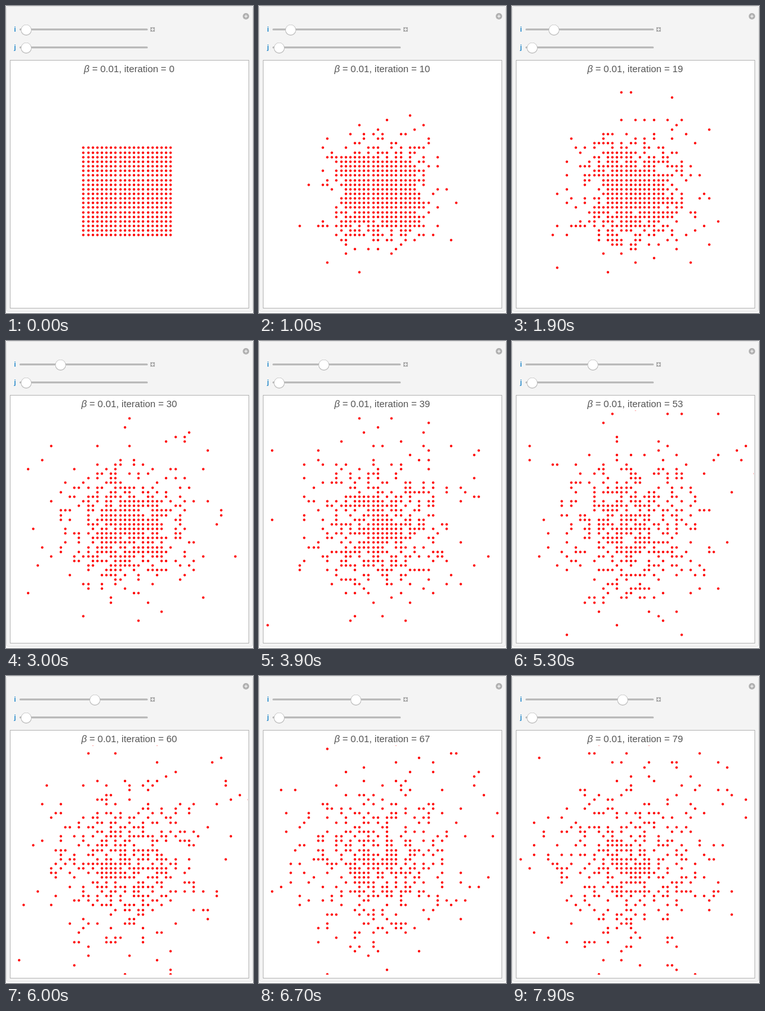
Animation, 385 px wide and 478 px high, one loop 8 s. Source, as an HTML page with a canvas:

```html
<!DOCTYPE html>
<html lang="en">
<head>
<meta charset="utf-8">
<title>Lattice diffusion</title>
<style>
html, body { margin: 0; width: 100%; height: 100%; overflow: hidden; background: #fff; }
canvas { display: block; }
</style>
</head>
<body>
<canvas id="stage" width="385" height="478"></canvas>
<script>
const ctx = document.getElementById('stage').getContext('2d');
const STEP_MS = 100, STEPS = 80, SIDE = 20;
const PITCH = 7.165, LEFT = 120.84, TOP = 220.85;
const HOPS_PER_STEP = 420;
const SANS = '"Liberation Sans", Arial, sans-serif';

// Seeded generator, so every loop shows the same walk.
let seed = 20417;
function random() {
  seed = (seed + 0x6D2B79F5) | 0;
  let r = Math.imul(seed ^ (seed >>> 15), 1 | seed);
  r = (r + Math.imul(r ^ (r >>> 7), 61 | r)) ^ r;
  return ((r ^ (r >>> 14)) >>> 0) / 4294967296;
}

// Random hops of one or two sites; an occupied site on the way blocks the hop,
// so the crowded core loosens slowly while free dots roam.
function simulate() {
  const key = (x, y) => x * 1000 + y;
  const dots = Array.from({ length: SIDE * SIDE }, (_, n) => [n % SIDE, Math.floor(n / SIDE)]);
  const taken = new Set(dots.map(([x, y]) => key(x, y)));
  const states = [];
  for (let step = 0; step < STEPS; step++) {
    states.push(dots.map(dot => [...dot]));
    for (let hop = 0; hop < HOPS_PER_STEP; hop++) {
      const dot = dots[Math.floor(random() * dots.length)];
      const sign = random() < 0.5 ? 1 : -1;
      const [dx, dy] = random() < 0.5 ? [sign, 0] : [0, sign];
      const reach = random() < 0.5 ? 1 : 2;
      const [x, y] = dot;
      if (taken.has(key(x + dx, y + dy))) continue;
      if (taken.has(key(x + dx * reach, y + dy * reach))) continue;
      taken.delete(key(x, y));
      dot[0] += dx * reach;
      dot[1] += dy * reach;
      taken.add(key(...dot));
    }
  }
  return states;
}

function rect(x, y, w, h, color) {
  ctx.fillStyle = color;
  ctx.fillRect(x, y, w, h);
}

function disc(x, y, r, color) {
  ctx.fillStyle = color;
  ctx.beginPath();
  ctx.arc(x, y, r, 0, 2 * Math.PI);
  ctx.fill();
}

function plus(x, y) {
  rect(x - 2.5, y - 0.5, 5, 1, '#fff');
  rect(x - 0.5, y - 2.5, 1, 5, '#fff');
}

function slider(label, y, thumbX) {
  ctx.font = 'bold 11px ' + SANS;
  ctx.fillStyle = '#2a8ccc';
  ctx.fillText(label, 12.5, y + 3);
  ctx.fillStyle = '#bbb';
  ctx.beginPath();
  ctx.roundRect(21, y - 2, 200, 3, 1.5);
  ctx.fill();
  disc(thumbX, y + 0.5, 8.4, '#b8b8b8');
  disc(thumbX, y + 0.2, 7.6, '#fff');
}

function title(step) {
  const rest = ` = 0.01, iteration = ${step}`;
  const plain = '14.9px ' + SANS, italic = 'italic ' + plain;
  ctx.font = italic;
  const betaWidth = ctx.measureText('β').width;
  ctx.font = plain;
  const x = 192 - (betaWidth + ctx.measureText(rest).width) / 2;
  ctx.fillStyle = '#555';
  ctx.fillText(rest, x + betaWidth, 103);
  ctx.font = italic;
  ctx.fillText('β', x, 103);
}

function draw(step) {
  rect(0, 0, 385, 478, '#fff');
  ctx.fillStyle = '#f4f4f4';
  ctx.strokeStyle = '#e0e0e0';
  ctx.lineWidth = 1;
  ctx.beginPath();
  ctx.roundRect(0.5, 0.5, 384, 475, 3);
  ctx.fill();
  ctx.stroke();

  disc(374, 16, 5, '#b0b0b0');
  plus(374, 16);
  slider('i', 37, 31.5 + step * 1.785);
  slider('j', 65, 31.5);
  rect(225, 33, 7, 7, '#b0b0b0');
  plus(228.5, 36.5);

  rect(6, 84, 373, 387, '#b8b8b8');
  rect(7, 85, 371, 385, '#fff');
  title(step);

  ctx.save();
  ctx.beginPath();
  ctx.rect(9, 108, 368, 357);
  ctx.clip();
  for (const [x, y] of states[step])
    disc(Math.floor(LEFT + x * PITCH) + 0.5, Math.floor(TOP + y * PITCH) + 0.5, 1.9, '#f00');
  ctx.restore();
}

const states = simulate();
const start = performance.now();
function tick() {
  draw(Math.floor((performance.now() - start) / STEP_MS) % STEPS);
  requestAnimationFrame(tick);
}
tick();
</script>
</body>
</html>
```
